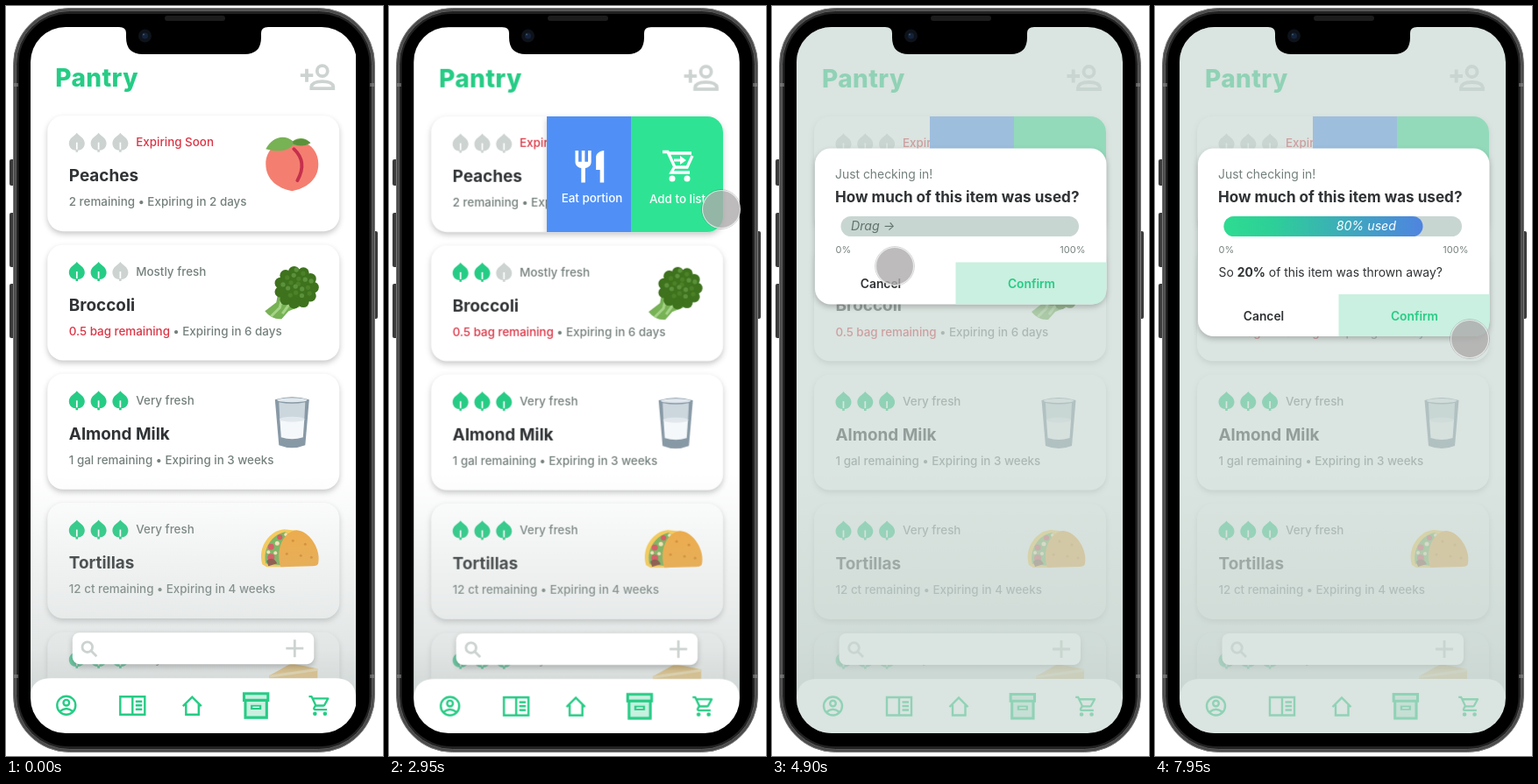
Animation, 430 px wide and 856 px high, one loop 8 s. Source, as an HTML page:

```html
<!DOCTYPE html>
<html lang="en">
<head>
<meta charset="utf-8">
<title>Pantry</title>
<style>
html, body { margin: 0; width: 100%; height: 100%; overflow: hidden; background: #fff; }
svg { display: block; font-family: Inter, sans-serif; font-size: 13.4px; }
.ink { fill: #303335; }
.muted { fill: #74807d; }
.warn { fill: #dc3545; }
.green { fill: #26cc85; }
.item { font-weight: 450; }
.bold { font-weight: 600; }
.title { font-size: 18.9px; font-weight: 700; }
.big { font-size: 13.9px; }
.tiny { font-size: 11px; }
.line { fill: none; stroke: #26cc85; stroke-width: 2.4; }
.shadow { filter: drop-shadow(0 3px 3px rgba(0,0,0,.22)); }

.nudge, .panel, .old, .dim, .new, .sheet, .footer, .question, .fill, .hint, .used, .cursor {
  animation: 8s linear infinite;
}
.nudge { animation-name: nudge; animation-timing-function: step-end; }
.panel { animation-name: panel; }
.old { animation-name: old; }
.dim { animation-name: dim; }
.new { animation-name: new; }
.sheet { animation-name: sheet; }
.footer { animation-name: footer; }
.question { animation-name: question; }
.fill { animation-name: fill; }
.hint { animation-name: hint; }
.used { animation-name: used; }
.cursor { animation-name: cursor; }

@keyframes nudge { 0% { transform: translate(-.7px,-.8px); } 11.25%, 100% { transform: none; } }
@keyframes panel {
  0%, 13.125% { transform: translateX(206px); animation-timing-function: ease-out; }
  17.5%, 100% { transform: none; }
}
@keyframes old {
  0%, 40.8% { transform: none; animation-timing-function: ease-out; }
  44.55%, 100% { transform: translateX(-93px); }
}
@keyframes dim {
  0%, 40.8% { opacity: 0; animation-timing-function: ease-out; }
  44.55%, 100% { opacity: .52; }
}
@keyframes new {
  0%, 40.8% { transform: translateX(372px); animation-timing-function: ease-out; }
  44.55%, 100% { transform: none; }
}
@keyframes sheet {
  0%, 67.5% { height: 178px; animation-timing-function: ease-out; }
  71.25%, 100% { height: 214.5px; }
}
@keyframes footer {
  0%, 67.5% { transform: none; animation-timing-function: ease-out; }
  71.25%, 100% { transform: translateY(36.5px); }
}
@keyframes question { 0%, 68.5% { opacity: 0; } 71.25%, 100% { opacity: 1; } }
@keyframes fill {
  0%, 67.4% { width: 23px; opacity: 0; }
  67.5% { width: 23px; opacity: 1; animation-timing-function: ease-out; }
  73.75%, 100% { width: 227px; opacity: 1; }
}
@keyframes hint { 0%, 67.5% { opacity: 1; } 68.75%, 100% { opacity: 0; } }
@keyframes used {
  0%, 67.5% { transform: translateX(-204px); opacity: 0; animation-timing-function: ease-out; }
  73.75%, 100% { transform: none; opacity: 1; }
}
@keyframes cursor {
  0%, 5% { transform: translate(462px,262px); animation-timing-function: ease-out; }
  11.25% { transform: translate(348px,216px); }
  13.125% { transform: translate(343px,214px); animation-timing-function: ease-in-out; }
  18% { transform: translate(205px,212px); animation-timing-function: ease-in-out; }
  23.75% { transform: translate(413px,248px); animation-timing-function: ease-out; }
  27.5%, 31.25% { transform: translate(424px,250px); animation-timing-function: ease-in-out; }
  36.875% { transform: translate(379px,232px); }
  43.125% { transform: translate(374px,230px); animation-timing-function: ease-in-out; }
  56.25% { transform: translate(158px,303px); }
  61.25% { transform: translate(140px,297px); animation-timing-function: ease-in-out; }
  65%, 67% { transform: translate(94px,252px); animation-timing-function: ease-in-out; }
  74.5% { transform: translate(303px,254px); animation-timing-function: ease-in-out; }
  85% { transform: translate(416px,524px); }
  88% { transform: translate(420px,528px); animation-timing-function: ease-in-out; }
  96% { transform: translate(360px,382px); }
  99.375%, 100% { transform: translate(359px,380px); }
}
</style>
</head>
<body>
<svg width="430" height="856" viewBox="0 0 430 856">
  <defs>
    <clipPath id="screen"><rect x="28" y="24" width="372" height="806" rx="40"/></clipPath>
    <clipPath id="card"><rect x="48" y="126" width="333" height="132" rx="18"/></clipPath>
    <linearGradient id="fog" x1="0" y1="0" x2="0" y2="1">
      <stop offset="0" stop-color="#b9c3c1" stop-opacity="0"/>
      <stop offset=".68" stop-color="#b9c3c1" stop-opacity=".42"/>
      <stop offset="1" stop-color="#b9c3c1" stop-opacity=".88"/>
    </linearGradient>
    <linearGradient id="bar" gradientUnits="userSpaceOnUse" x1="78" x2="305" y1="0" y2="0">
      <stop offset="0" stop-color="#2edc91"/>
      <stop offset=".25" stop-color="#2dcf98"/>
      <stop offset="1" stop-color="#4f84e0"/>
    </linearGradient>

    <g id="leaf">
      <path d="M0-11C3-7 9-5 9 1 9 6 5 9 1.3 9V11H-1.3V9C-5 9-9 6-9 1-9-5-3-7 0-11Z"/>
      <path d="M0 0V8" stroke="#fff" stroke-width="1.7"/>
    </g>

    <g id="peach">
      <path d="M327 157C343 152 357 164 357 181 357 200 342 209 327 212 311 209 297 199 297 181 297 164 312 152 327 157Z" fill="#f47f70"/>
      <path d="M329 164Q345 179 333 200" fill="none" stroke="#c5304c" stroke-width="3.8" stroke-linecap="round"/>
      <path d="M328 159C322 168 307 167 297 164 304 151 317 146 328 155 334 150 343 151 348 157 342 161 334 161 328 159Z" fill="#77b255"/>
      <path d="M328 155Q339 149 348 157 339 163 328 158Z" fill="#5c913b"/>
    </g>

    <g id="broccoli">
      <path d="M311 328L309 339 296 349Q304 359 315 358L323 349 338 343Z" fill="#77b255"/>
      <path d="M316 332L313 345 303 355M324 341L316 352" fill="none" stroke="#a6d388" stroke-width="3"/>
      <g id="florets"></g>
    </g>

    <g id="milk">
      <path d="M307.500 450Q327 444 346.500 450L342 502Q327 508 312 502Z" fill="#8899a6"/>
      <path d="M312 453Q327 456 342 453L341 473H313Z" fill="#ccd6dd"/>
      <path d="M313 472H341L339.500 493Q327 497 314.500 493Z" fill="#f5f8fa"/>
      <ellipse cx="327" cy="472.500" rx="14" ry="3" fill="#e1e8ed"/>
      <ellipse cx="327" cy="450.500" rx="17" ry="2.500" fill="#e1e8ed"/>
    </g>

    <g id="taco">
      <path d="M293 638C287 618 302 599 318 598L336 600 318 641H298Z" fill="#ffcc4d"/>
      <path d="M297 637C293 620 304 604 319 601L328 606 315 639Z" fill="#77b255"/>
      <g fill="#dd4b54"><circle cx="303" cy="618" r="3.500"/><circle cx="313" cy="607" r="3"/><circle cx="303" cy="630" r="4"/></g>
      <g fill="#ffe8b6"><circle cx="310" cy="614" r="2.500"/><circle cx="300" cy="624" r="2"/><circle cx="320" cy="604" r="2"/><circle cx="308" cy="625" r="2"/></g>
      <path d="M298 634Q305 628 310 637L300 640Z" fill="#854836"/>
      <path d="M314 641C308 622 316 601 332 599 348 600 360 622 357 636Q357 640 350 640Z" fill="#f4a93c"/>
      <g fill="#d98a25"><circle cx="328" cy="611" r="1.500"/><circle cx="342" cy="615" r="1.500"/><circle cx="321" cy="626" r="1.500"/><circle cx="337" cy="628" r="1.500"/><circle cx="349" cy="630" r="1.500"/></g>
    </g>

    <path id="cart" d="M15.550 13c.75 0 1.410-.41 1.750-1.030l3.580-6.490c.37-.66-.11-1.480-.87-1.480H5.210l-.94-2H1v2h2l3.600 7.590-1.350 2.440C4.520 15.370 5.480 17 7 17h12v-2H7l1.100-2h7.450zM6.160 6h12.150l-2.760 5H8.530L6.160 6zM7 18a2 2 0 1 0 0 4 2 2 0 0 0 0-4zm10 0a2 2 0 1 0 0 4 2 2 0 0 0 0-4z"/>

    <g id="actions" fill="#fff" font-weight="500">
      <path d="M180 126H276V258H180Z" fill="#5090f6"/>
      <path d="M276 126H381V258H276Z" fill="#2ee494"/>
      <path transform="translate(207 161.400) scale(1.820)" d="M11 9H9V2H7v7H5V2H3v7c0 2.120 1.660 3.840 3.750 3.970V22h2.500v-9.030C11.340 12.840 13 11.120 13 9V2h-2v7zm5-3v8h2.500v8H21V2c-2.760 0-5 2.240-5 4z"/>
      <path d="M312 166.500H318L326 184H340L346 171M318 168H345M326 183L322 190H343" fill="none" stroke="#fff" stroke-width="3.300"/>
      <path d="M325 174.500H332V171L339 176 332 181V177.500H325Z"/>
      <circle cx="323" cy="197" r="3.500"/><circle cx="340" cy="197" r="3.500"/>
      <text x="231.500" y="223.500" text-anchor="middle">Eat portion</text>
      <text x="329" y="224.500" text-anchor="middle">Add to list</text>
    </g>

    <g id="pantry">
      <rect x="28" y="24" width="372" height="806" fill="#fff"/>
      <text x="57" y="92.500" class="green" font-size="28" font-weight="800" letter-spacing=".4">Pantry</text>
      <g fill="none" stroke="#ccd3d0" stroke-width="3.800">
        <path d="M336.500 80H351M343.700 72.500V87.500"/>
        <circle cx="361.500" cy="75" r="6"/>
        <path d="M349 95V93Q350 87 361.500 87T374 93V95Z"/>
      </g>
      <g id="cards"></g>
      <use href="#peach"/><use href="#broccoli"/><use href="#milk"/><use href="#taco"/>
      <path d="M301 765L326 751 356 757V785H301Z" fill="#f5bb58"/>
      <path d="M301 766L356 758" stroke="#ffe09a" stroke-width="3"/>
      <rect x="28" y="535" width="372" height="295" fill="url(#fog)"/>
      <g class="shadow"><rect x="76.500" y="716" width="275.500" height="36" rx="8" fill="#fff"/></g>
      <g fill="none" stroke="#ccd3d0" stroke-width="2.800">
        <circle cx="93.500" cy="732.500" r="5.800"/><path d="M98 737L104 743M320 734H340M330 724V744"/>
      </g>
      <path d="M28 830V792Q28 768 52 768H376Q400 768 400 792V830Z" fill="#fff"/>
      <g class="line">
        <circle cx="69.500" cy="799" r="10.500"/><circle cx="69.500" cy="796" r="3.300"/><path d="M62 806Q69.500 799.500 77 806"/>
        <path d="M131 789H159V809.500H131ZM145 789V809.500M148.500 794.500H156M148.500 799H156M148.500 803.500H156"/>
        <path d="M202.500 800L213 789.500 223.500 800M206 797.500V809.500H220.500V797.500"/>
      </g>
      <g transform="translate(267.600 781) scale(1.520)">
        <path d="M3 3H21V21H4V9Z" fill="#c9f0e0"/>
        <path class="green" fill-rule="evenodd" d="M2 2H22V9H21V22H3V9H2ZM4 4V7H20V4ZM5 9V20H19V9ZM8 11.500H16V15H8Z"/>
        <path d="M9.500 12.800H14.500V13.700H9.500Z" fill="#fff"/>
      </g>
      <use href="#cart" class="green" transform="translate(345 785.500) scale(1.150)"/>
    </g>
  </defs>

  <g fill="#3b3b3b">
    <rect x="4" y="175" width="7" height="30" rx="2"/>
    <rect x="4" y="236" width="7" height="62" rx="2"/>
    <rect x="4" y="317" width="7" height="62" rx="2"/>
    <rect x="417" y="257" width="7" height="100" rx="2"/>
  </g>
  <rect x="8.500" y="2.500" width="412" height="849" rx="64" fill="#4b4b4b" stroke="#777"/>
  <rect x="11.500" y="5.500" width="406" height="843" rx="61" fill="#222" stroke="#5c5c5c"/>
  <rect x="14.500" y="9" width="400" height="836" rx="57" fill="#000"/>
  <path d="M9 90H14M9 765H14M415 90H420M415 765H420" stroke="#999" stroke-width="4" opacity=".5"/>

  <g clip-path="url(#screen)">
    <g class="old">
      <g class="nudge"><use href="#pantry"/></g>
      <g clip-path="url(#card)"><g class="panel shadow"><use href="#actions"/></g></g>
    </g>
    <rect class="dim" x="28" y="24" width="372" height="806"/>
    <g class="new">
      <use href="#pantry"/>
      <g clip-path="url(#card)"><use href="#actions"/></g>
      <rect x="28" y="24" width="372" height="806" fill="#c7d6d0" opacity=".66"/>
      <g class="shadow"><rect class="sheet" x="49" y="162.500" width="332.500" height="178" rx="18" fill="#fff"/></g>
      <text x="72" y="197" class="muted big">Just checking in!</text>
      <text x="72" y="223.500" class="ink" font-size="17.100" font-weight="700">How much of this item was used?</text>
      <rect x="78.500" y="240" width="271.500" height="23" rx="11.500" fill="#c8d6d2"/>
      <text x="90" y="256.300" class="hint" fill="#60736d" font-size="14.200" font-style="italic">Drag →</text>
      <rect class="fill" x="78.500" y="240" width="23" height="23" rx="11.500" fill="url(#bar)"/>
      <text x="275" y="256.300" class="used" fill="#fff" font-size="14.200" font-style="italic" text-anchor="end">80% used</text>
      <text x="72.500" y="282" class="muted tiny">0%</text>
      <text x="357.500" y="282" class="muted tiny" text-anchor="end">100%</text>
      <text x="72.500" y="308.500" class="ink big question">So <tspan font-weight="700">20%</tspan> of this item was thrown away?</text>
      <g class="footer bold" font-size="13.800" text-anchor="middle">
        <path d="M209.500 292.500H381.500V322.500Q381.500 340.500 363.500 340.500H209.500Z" fill="#c9f0e0"/>
        <text x="124" y="322" class="ink">Cancel</text>
        <text x="296" y="322" class="green">Confirm</text>
      </g>
    </g>
  </g>

  <path d="M129 22V24Q137 24 137 31V36Q137 55 156 55H272Q291 55 291 36V31Q291 24 299 24V22Z"/>
  <rect x="181" y="11" width="69" height="6" rx="3" fill="#1c1c1c"/>
  <circle cx="158.500" cy="34" r="7.500" fill="#0e1219"/>
  <circle cx="158.500" cy="34" r="3.500" fill="#14233a"/>
  <circle cx="157" cy="32.500" r="1" fill="#3d566f"/>

  <g class="cursor">
    <circle r="22.300" fill="none" stroke="#000" stroke-opacity=".2"/>
    <circle r="21.500" fill="#adabab" fill-opacity=".8" stroke="#eee" stroke-opacity=".8" stroke-width="1.200"/>
  </g>
</svg>
<script>
const items = [
  { name: 'Peaches', fresh: 0, tag: 'Expiring Soon', left: '2 remaining', due: '2 days' },
  { name: 'Broccoli', fresh: 2, tag: 'Mostly fresh', left: '0.5 bag remaining', due: '6 days', low: true },
  { name: 'Almond Milk', fresh: 3, tag: 'Very fresh', left: '1 gal remaining', due: '3 weeks' },
  { name: 'Tortillas', fresh: 3, tag: 'Very fresh', left: '12 ct remaining', due: '4 weeks' },
  { name: 'Cheese', fresh: 3, tag: 'Very fresh', left: '1 lb remaining', due: '5 weeks' },
];

const leaf = (n, fresh) =>
  `<use href="#leaf" x="${81.5 + 24.8 * n}" y="30.5" fill="${n < fresh ? '#26cc85' : '#ccd3d0'}"/>`;

const card = (item, i) => `<g class="item" transform="translate(0 ${126 + 147.3 * i})">
  <rect class="shadow" x="48" width="333" height="132" rx="18" fill="#fff"/>
  ${[0, 1, 2].map(n => leaf(n, item.fresh)).join('')}
  <text x="149" y="35.3" class="${item.fresh ? 'muted' : 'warn'}">${item.tag}</text>
  <text x="72.5" y="75" class="ink title">${item.name}</text>
  <text x="72.5" y="103.3" class="muted"><tspan class="${item.low ? 'warn' : ''}">${item.left}</tspan> • Expiring in ${item.due}</text>
</g>`;

const dot = (x, y, r, color) => `<circle cx="${x}" cy="${y}" r="${r}" fill="${color}"/>`;

// A bumpy head, then lighter buds on a spiral.
function florets() {
  let out = dot(332, 322, 19, '#3e721d');
  for (let i = 0; i < 11; i++) {
    const a = i * Math.PI * 2 / 11;
    out += dot(332 + 19 * Math.cos(a), 322 + 18 * Math.sin(a), 6.5, '#3e721d');
  }
  for (let i = 0; i < 18; i++) {
    const a = i * 2.4, r = 4.2 * Math.sqrt(i);
    out += dot(334 + r * Math.cos(a), 318 + r * Math.sin(a), 2.6, i % 2 ? '#5c913b' : '#4c8128');
  }
  return out;
}

document.getElementById('cards').innerHTML = items.map(card).join('');
document.getElementById('florets').innerHTML = florets();
</script>
</body>
</html>
```
